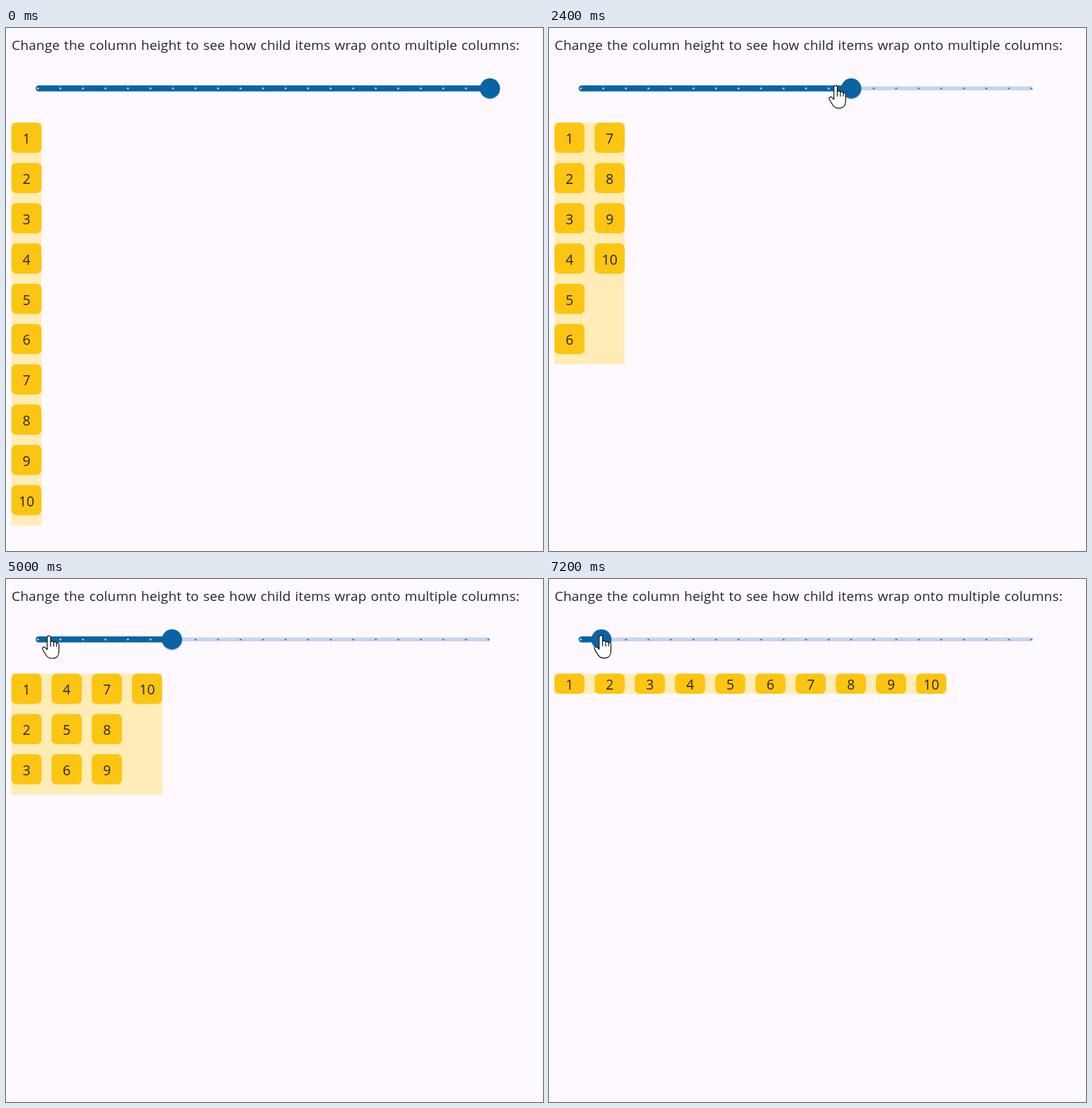
Write an HTML page that moves like this. It is 759 by 738 pixels and loops after 8 s.

```html
<!DOCTYPE html>
<html lang="en">
<head>
<meta charset="utf-8">
<title>Wrapping column</title>
<style>
  html, body { margin: 0; width: 100%; height: 100%; overflow: hidden; background: #fef8ff; }
  svg { display: block; width: 759px; height: 738px; }
  text { font-family: "Open Sans", "Noto Sans", sans-serif; fill: #27252b; }
  .title { font-size: 19px; letter-spacing: .2px; word-spacing: .8px; }
  .item text { font-size: 19.3px; text-anchor: middle; }
  .item rect { fill: #fbc511; }
  #tip text { font-size: 22.5px; text-anchor: middle; fill: #fff; }
  #tip path { fill: rgba(97, 96, 98, .9); }
</style>
</head>
<body>
<svg viewBox="0 0 759 738">
  <rect width="759" height="738" fill="#fef8ff"/>
  <text class="title" x="8" y="31">Change the column height to see how child items wrap onto multiple columns:</text>
  <rect id="box" x="7.6" y="133.6" fill="#ffecb6"/>
  <g id="items"></g>
  <rect x="42" y="82.4" width="642" height="5.7" rx="2.8" fill="#c4d6ee"/>
  <rect id="active" x="42" y="81" height="8.5" rx="4.2" fill="#0864a3"/>
  <g id="ticks"></g>
  <g id="thumb">
    <circle id="halo" r="34" fill="#0864a3" fill-opacity=".11"/>
    <circle cy="1.3" r="14.6" fill="#000" fill-opacity=".16"/>
    <circle r="14.2" fill="#0864a3"/>
    <circle id="click" stroke-width="1.2"/>
  </g>
  <g id="tip"><path/><text x="-.4" y="34.8"></text></g>
  <g id="hand" fill="#fff" stroke="#111" stroke-width="1.2" stroke-linejoin="round" stroke-linecap="round">
    <path d="M-2.3 2.5a2.4 2.4 0 0 1 4.8 0V8.5C4 7 6.5 7.5 7 9.3C8.5 8 10.5 8.7 11 10.5C12.6 9.6 14.3 10.5 14.3 13V22C14.3 28 11 32 5.5 32H4C0 32-2.5 30-4.5 26.5L-8.6 19.8C-10 17-7.5 15-5.3 16.6L-2.3 19.5Z"/>
    <path fill="none" d="M2.5 8.5V15M7 9.3V15M11 10.5V15"/>
  </g>
  <path id="arrow" d="M0 0V23L5.4 18L9 26.3L12.6 24.7L9 16.7H16.2Z" fill="#fff" stroke="#111" stroke-width="1.2"/>
</svg>
<script>
const LOOP = 8000, STEP = 200, SCALE = 1.4205, COUNT = 10, TOP = 133.6, LEFT = 7.6;
const ITEM = 30, GAP = 10, TRACK_Y = 85.2;

// When each value takes effect, and when the slider is pressed.
const VALUES = [[0, 400], [1800, 240], [3400, 120], [6000, 20]];
const PRESSES = [1600, 3400, 6000];
const TIP_TIME = 600;

// Pointer path: time, x, y
const POINTER = [
  [200, 470, 636], [1000, 430, 86], [1400, 424.5, 81], [2200, 424.5, 81],
  [3200, 236.5, 83], [4600, 236.5, 83], [5000, 60.5, 80], [5400, 60.5, 80],
  [5800, 73.2, 79.6], [LOOP, 73.2, 79.6]
];

const $ = id => document.getElementById(id);
const set = (el, attrs) => { for (const k in attrs) el.setAttribute(k, attrs[k]); return el; };
const add = (parent, tag, attrs = {}) =>
  set(parent.appendChild(document.createElementNS("http://www.w3.org/2000/svg", tag)), attrs);
const show = (el, on) => set(el, { visibility: on ? "visible" : "hidden" });
const move = (el, x, y) => set(el, { transform: `translate(${x} ${y})` });
const thumbX = value => 42 + value * 1.605;
const tickX = i => 45 + i * 31.84;

const items = Array.from({ length: COUNT }, (_, i) => {
  const g = add($("items"), "g", { class: "item" });
  const rect = add(g, "rect", { width: ITEM * SCALE, rx: 7 });
  const label = add(g, "text", { x: ITEM * SCALE / 2 + .1 });
  label.textContent = i + 1;
  return { g, rect, label };
});
const ticks = Array.from({ length: 21 }, (_, i) =>
  add($("ticks"), "circle", { cx: tickX(i), cy: TRACK_Y, r: 1.5 }));
const [tipShape, tipText] = $("tip").children;

function pointerAt(t) {
  const i = POINTER.findIndex(p => p[0] > t);
  const [t0, x0, y0] = POINTER[i - 1], [t1, x1, y1] = POINTER[i];
  const k = (t - t0) / (t1 - t0), e = k * k * (3 - 2 * k);
  return [x0 + (x1 - x0) * e, y0 + (y1 - y0) * e];
}

function layout(height) {
  const rows = Math.max(1, Math.floor((height + GAP) / (ITEM + GAP)));
  const pitch = (ITEM + GAP) * SCALE, h = Math.min(ITEM, height) * SCALE;
  set($("box"), {
    width: Math.ceil(COUNT / rows) * pitch - GAP * SCALE,
    height: height * SCALE
  });
  items.forEach(({ g, rect, label }, i) => {
    move(g, LEFT + Math.floor(i / rows) * pitch, TOP + i % rows * pitch);
    set(rect, { height: h });
    set(label, { y: h / 2 + 8.4 });
  });
}

function drawTip(x, value) {
  const label = value.toFixed(1), half = label.length > 4 ? 51.7 : 45.3;
  set(tipShape, {
    d: `M${-half} -6V49a5 5 0 0 0 5 5H-11.5L0 65L11.5 54H${half - 5}a5 5 0 0 0 5 -5V-6Z`
  });
  tipText.textContent = label;
  move($("tip"), x, 0);
}

function drawSlider(value, sincePress) {
  const x = thumbX(value), pressed = sincePress < STEP;
  set($("active"), { width: x - 42 });
  ticks.forEach((tick, i) =>
    set(tick, { fill: tickX(i) < x ? "#a6c8e6" : "#5f88b2" }));
  move($("thumb"), x, TRACK_Y);
  show($("halo"), pressed);
  show($("click"), sincePress < 2 * STEP);
  set($("click"), pressed
    ? { r: 10, cy: -2, fill: "#50496f", stroke: "#7d4060" }
    : { r: 13.6, cy: 0, fill: "#3a4c82", stroke: "#6d6a88" });
  show($("tip"), sincePress < TIP_TIME);
  drawTip(x, value);
}

function draw(time) {
  const t = Math.floor(time % LOOP / STEP) * STEP;
  const value = VALUES.filter(v => v[0] <= t).pop()[1];
  const press = PRESSES.filter(p => p <= t).pop() ?? -Infinity;
  layout(value);
  drawSlider(value, t - press);

  const visible = t >= POINTER[0][0];
  const [x, y] = visible ? pointerAt(t) : [0, 0];
  const overSlider = y < 112;
  show($("hand"), visible && overSlider);
  show($("arrow"), visible && !overSlider);
  move($("hand"), x, y);
  move($("arrow"), x, y);
}

const start = performance.now();
function frame() {
  draw(performance.now() - start);
  requestAnimationFrame(frame);
}
frame();
</script>
</body>
</html>
```
